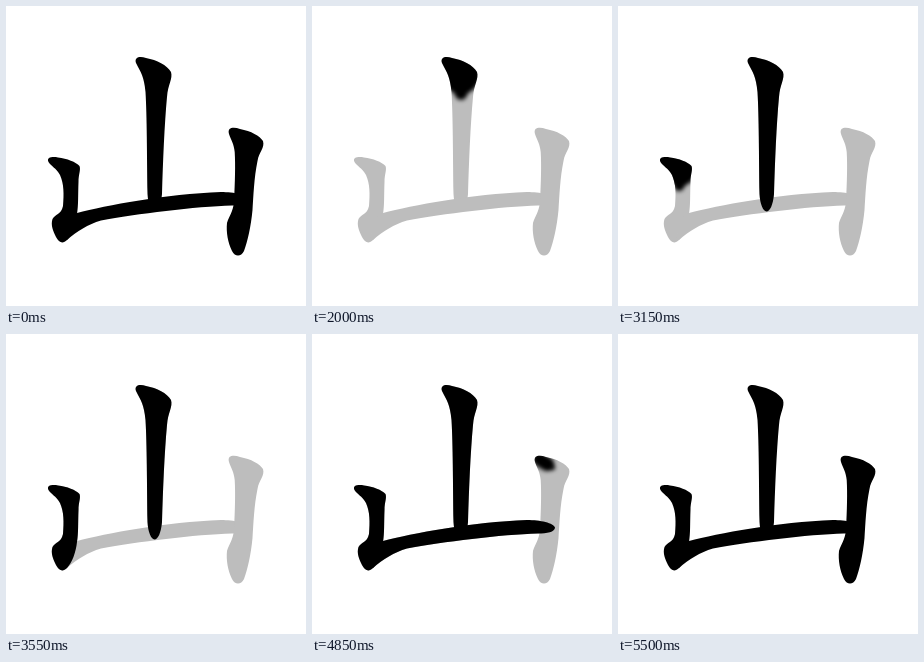
Write an HTML page with a canvas that moves like this. It is 300x300 px and loops after 6500 ms.

```html
<!DOCTYPE html>
<html lang="zh">
<head>
<meta charset="utf-8">
<title>Stroke order</title>
<style>
html, body { margin: 0; width: 100%; height: 100%; overflow: hidden; background: #fff; }
canvas { display: block; width: 100%; height: 100%; }
</style>
</head>
<body>
<canvas id="stage" width="300" height="300"></canvas>
<script>
const LOOP = 6500, FADE = 1000, DONE = 5500, STEP = 100;
const GREY = '#bdbdbd', INK = '#000';
const ctx = document.getElementById('stage').getContext('2d');

// head: [time, x, y, radius] for the first touches; run: evenly spaced brush steps
const parts = [
  {
    shape: 'M130 57C128 51 134 50 140 52C151 54 161 59 165 66C167 73 162 78 161 91C158.5 118 157 155 156 188C155 199 152 205.5 148.5 205.5C145 205 142 198 141.5 188C141 150 141 110 139.5 86C138 70 135 67 130 57Z',
    start: [132, 55],
    head: [[1750, 141, 59, 7], [1850, 148, 66, 15]],
    run: { time: 2000, count: 5, from: [149, 68], to: [149, 180], radius: 20 }
  },
  {
    shape: 'M42.5 156C40 151 47 150.5 52 151.5C61 152.5 70 156 73.5 160C75 164 72.5 168 72.5 176C72 188 72.5 200 71 208C70 218 66 229 61 234C57 238 53 237 50 231C47 225 44.5 219 46.5 213C49 208 55 209 57 200C58 188 58 178 54 169C50 162 45 160 42.5 156Z',
    start: [45, 154],
    head: [[2900, 52, 157, 6], [3000, 56, 158, 9]],
    run: { time: 3150, count: 5, from: [62, 163], to: [59, 218], radius: 17 }
  },
  {
    shape: 'M66 208L71 207C100 199.5 160 188 215 186C228 186 242 189 243 193.5C243 198 235 199.5 226 199.5C190 200.5 130 208 95 214.5C82 218.5 71 225 61 234L58 233Z',
    start: [64, 226],
    head: [[3700, 73, 217, 10]],
    run: { time: 3850, count: 6, from: [98, 207], to: [229, 192], radius: 14 }
  },
  {
    shape: 'M223 128C221 121 228 121 234 123C245 125 254 130 257 135C259 142 253 146 251.5 155C248 172 247.5 190 246.5 204C245 220 241.5 236 238 245C235 251 229 251 226 245C222 237 220 226 221 217C223 210 227 206 228 196C229 175 229.5 160 228.7 146C228 138 225 134 223 128Z',
    start: [227, 125],
    head: [[4850, 235, 130, 7], [4950, 243, 135, 15]],
    run: { time: 5100, count: 5, from: [241, 140], to: [232, 230], radius: 20 }
  }
];
for (const part of parts) part.outline = new Path2D(part.shape);

function fillPart(part, color) {
  ctx.fillStyle = color;
  ctx.fill(part.outline);
}

function line(points, width) {
  ctx.lineWidth = width;
  ctx.beginPath();
  points.forEach(([x, y]) => ctx.lineTo(x, y));
  ctx.stroke();
}

// Soft round brush with a narrow leading tip, kept inside the outline
function brush(part, points, radius, from, to) {
  const dx = to[0] - from[0], dy = to[1] - from[1];
  const reach = radius / Math.hypot(dx, dy);
  const [x, y] = points[points.length - 1];
  ctx.save();
  ctx.clip(part.outline);
  ctx.filter = 'blur(2px)';
  ctx.strokeStyle = INK;
  ctx.lineCap = ctx.lineJoin = 'round';
  line(points, radius * 2);
  line([[x, y], [x + dx * reach, y + dy * reach]], radius * 0.6);
  ctx.restore();
}

function drawPart(part, t) {
  const { start, head, run } = part;
  const touched = head.filter(h => t >= h[0]);
  if (!touched.length) return;
  const points = [start, ...touched.map(h => [h[1], h[2]])];
  if (t < run.time) {
    const radius = touched[touched.length - 1][3];
    brush(part, points, radius, points[points.length - 2], points[points.length - 1]);
    return;
  }
  const step = Math.floor((t - run.time) / STEP), last = run.count - 1;
  if (step >= last) {
    fillPart(part, INK);
    return;
  }
  const mix = i => run.from[i] + (run.to[i] - run.from[i]) * step / last;
  points.push(run.from, [mix(0), mix(1)]);
  brush(part, points, run.radius, run.from, run.to);
}

function draw() {
  const t = performance.now() % LOOP;
  const full = t < FADE || t >= DONE;
  ctx.fillStyle = '#fff';
  ctx.fillRect(0, 0, 300, 300);
  parts.forEach(part => fillPart(part, full ? INK : GREY));
  if (!full) parts.forEach(part => drawPart(part, t));
  requestAnimationFrame(draw);
}
draw();
</script>
</body>
</html>
```
